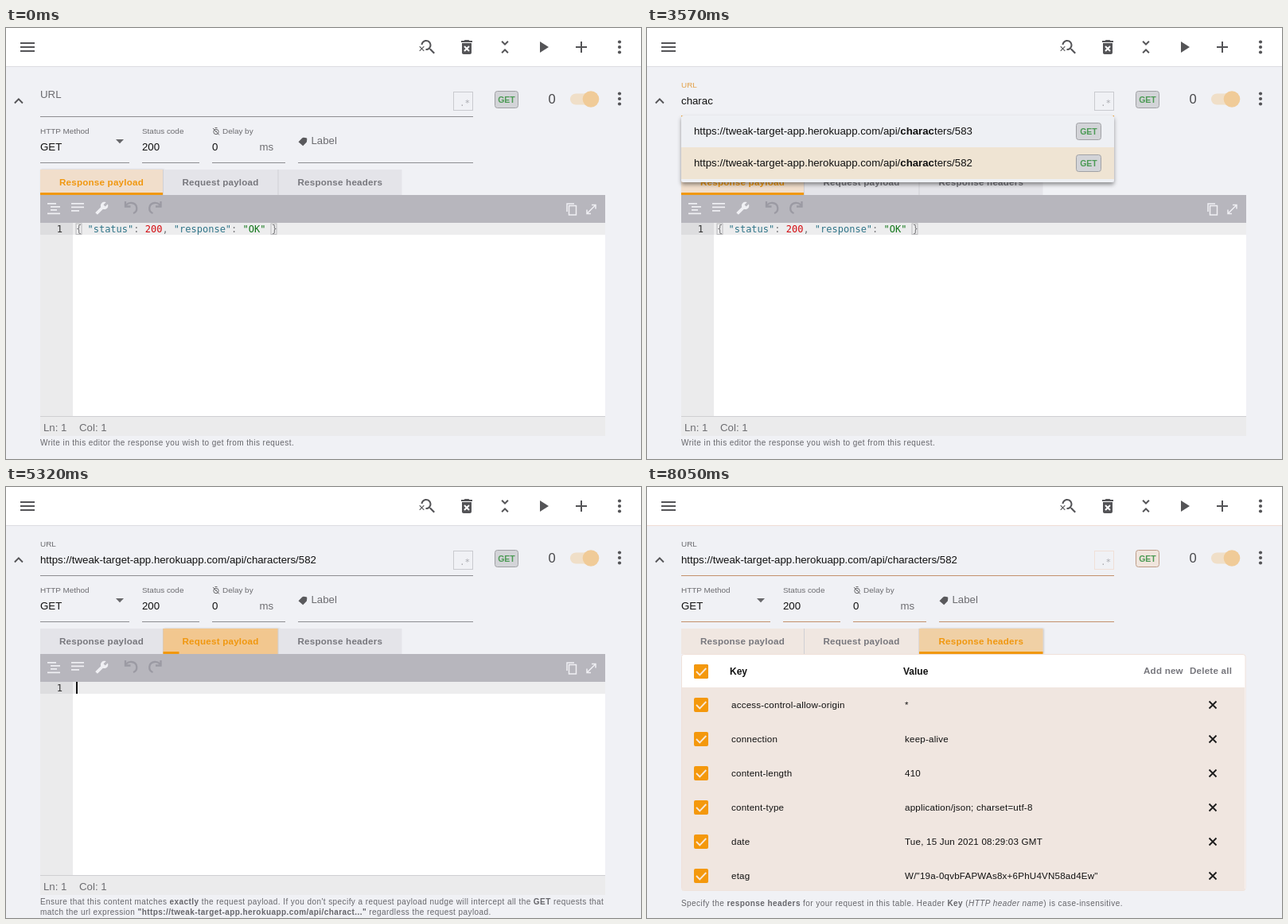
Write an HTML page that moves like this. It is 798 by 542 pixels and loops after 8120 ms.

```html
<!DOCTYPE html>
<html lang="en">
<head>
<meta charset="utf-8">
<title>Request editor</title>
<style>
html, body { margin: 0; width: 100%; height: 100%; overflow: hidden; background: #f0f1f5; }
svg { display: block; width: 798px; height: 542px; }
text { font-family: "Liberation Sans", Arial, sans-serif; white-space: pre; fill: #111; }
.body { font-size: 13.25px; }
.small { font-size: 9.94px; fill: #6c6c70; }
.tabText { font-size: 11.6px; font-weight: bold; letter-spacing: .22px; fill: #77777d; }
.hint { font-size: 10px; letter-spacing: .43px; fill: #66666b; }
.cell { font-size: 11.6px; letter-spacing: .2px; }
.head { font-size: 12px; font-weight: bold; }
.chipText { font-size: 10.5px; font-weight: bold; fill: #4b9a54; }
.code { font: 12px "DejaVu Sans Mono", "Liberation Mono", monospace; }
.key { fill: #2f7488; } .str { fill: #12771a; } .num { fill: #d40d12; } .pun { fill: #77777a; }
.grey { fill: #6c6c70; }
.icon { fill: #545457; }
.line { fill: #8d8d91; }
.tab { fill: #e4e4e9; }
.chip { fill: #d3d4d8; stroke: #a0a1a5; }
.box { fill: none; stroke: #c9cacf; }
.bar { fill: #f1980f; }
.warm .line { fill: #c3916c; }
.warm .tab { fill: #f0e7e1; }
.warm .chip { fill: #f0e5dd; stroke: #bd9c88; }
.warm .box { stroke: #f0e0d7; }
.warm #edge { fill: #f0dcd5; }
</style>
</head>
<body>
<svg id="stage" viewBox="0 0 798 542"></svg>
<script>
const LOOP = 8120, STEP = 70;
const URL_TEXT = 'https://tweak-target-app.herokuapp.com/api/characters/582';
const TABS = [
  { x: 43, w: 154.5, tx: 67, name: 'Response payload' },
  { x: 197.5, w: 145, tx: 221.5, name: 'Request payload' },
  { x: 342, w: 155.5, tx: 366.5, name: 'Response headers' }
];
const HEADERS = [
  ['access-control-allow-origin', '*'],
  ['connection', 'keep-alive'],
  ['content-length', '410'],
  ['content-type', 'application/json; charset=utf-8'],
  ['date', 'Tue, 15 Jun 2021 08:29:03 GMT'],
  ['etag', 'W/"19a-0qvbFAPWAs8x+6PhU4VN58ad4Ew"']
];
const PAYLOAD = [
  '{',
  '  "url": "https://anapioficeandfire.com/api/characters/582",',
  '  "name": "Tob Wenlark",',
  '  "gender": "Male",',
  '  "culture": "Valemen",',
  '  "born": "",',
  '  "died": "",',
  '  "titles": [',
  '    "Ser"',
  '  ],',
  '  "aliases": [',
  '    ""',
  '  ],',
  '  "father": "",',
  '  "mother": "",',
  '  "spouse": "",',
  '  "allegiances": ['
];

// Markup helpers
const text = (x, y, s, cls, more = '') => `<text x="${x}" y="${y}" class="${cls}" ${more}>${s}</text>`;
const rect = (x, y, w, h, more) => `<rect x="${x}" y="${y}" width="${w}" height="${h}" ${more}/>`;
const fill = (x, y, w, h, c) => rect(x, y, w, h, `fill="${c}"`);
const group = (id, inner, more = '') => `<g id="${id}" ${more}>${inner}</g>`;
const icon = (x, y, d, scale = 1) =>
  `<path class="icon" transform="translate(${x} ${y}) scale(${scale})" d="${d}"/>`;
const stroke = (d, c, w, more = '') =>
  `<path d="${d}" fill="none" stroke="${c}" stroke-width="${w}" ${more}/>`;
const dots = (x, y) => [-6.5, 0, 6.5].map(d => `<circle class="icon" cx="${x}" cy="${y + d}" r="2.1"/>`).join('');
const chip = (x, y, w) => rect(x + .5, y + .5, w - 1, 21, 'rx="3" class="chip"') +
  text(x + w / 2, y + 15, 'GET', 'chipText', 'text-anchor="middle"');
const tick = y => rect(59, y - 9, 18, 18, 'rx="2" fill="#f4980c"') +
  stroke(`M62 ${y}l4.3 4.3 8-8.3`, '#f8e8d8', 1.9);

function paint(line) {
  return line.replace(/"[^"]*"|\d+|[^"\d]+/g, (m, i) => {
    const cls = m[0] === '"' ? (line[i + m.length] === ':' ? 'key' : 'str') : /\d/.test(m) ? 'num' : 'pun';
    return `<tspan class="${cls}">${m}</tspan>`;
  });
}

function topBar() {
  return fill(0, 0, 798, 48, '#fff') + rect(0, 48, 798, 1, 'id="edge" fill="#dcdde1"') +
    icon(15, 12, 'M3 18h18v-2H3zm0-5h18v-2H3zm0-7v2h18V6z') +
    icon(518.5, 12, 'M15.5 14h-.79l-.28-.27C15.41 12.59 16 11.11 16 9.5 16 5.91 13.09 3 9.5 3 6.08 3 3.28 5.64 3.03 9h2.02C5.3 6.75 7.18 5 9.5 5 11.99 5 14 7.01 14 9.5S11.99 14 9.5 14c-.17 0-.33-.03-.5-.05v2.02c.17.02.33.03.5.03 1.61 0 3.09-.59 4.23-1.57l.27.28v.79l5 4.99L20.49 19z') +
    stroke('M519.7 23.2l5.6 5.6m0-5.6l-5.6 5.6', '#545457', 1.1) +
    icon(567, 12, 'M6 19c0 1.1.9 2 2 2h8c1.1 0 2-.9 2-2V7H6zM15.5 4l-1-1h-5l-1 1H5v2h14V4z') +
    stroke('M576 23l6 6m0-6l-6 6', '#fff', 2) +
    icon(615, 12, 'M7.41 18.59L8.83 20 12 16.83 15.17 20l1.41-1.41L12 14zM16.59 5.41L15.17 4 12 7.17 8.83 4 7.41 5.41 12 10z') +
    icon(663, 12, 'M8 5v14l11-7z') +
    icon(711, 12, 'M19 13h-6v6h-2v-6H5v-2h6V5h2v6h6z') + dots(771, 24);
}

function fields() {
  const rule = (x, w, y) => rect(x, y, w, 1, 'class="line"');
  return icon(4.5, 80.5, 'M12 8l-6 6 1.4 1.4L12 10.8l4.6 4.6L18 14z', .95) +
    rule(43, 544, 111) + rule(43, 112, 169) + rule(171, 72, 169) + rule(259, 92, 169) + rule(367, 220, 169) +
    rect(43, 110, 544, 2, 'id="focusLine"') +
    text(43, 88, 'URL', 'body', 'id="label"') + text(43, 96, '', 'body', 'id="url"') +
    rect(43, 84, 1.2, 15, 'id="caret" fill="#e39b35"') +
    rect(562.5, 80.5, 24, 23, 'class="box"') + text(570, 98, '.*', 'code', 'style="fill:#a9aaaf;font-size:11px"') +
    chip(614, 79, 30) + text(686, 95, '0', '', 'text-anchor="middle" style="font-size:16.5px;fill:#48484b"') +
    rect(709, 82.5, 34, 14, 'rx="7" id="track"') + '<circle cx="735" cy="89.5" r="10.3" id="thumb"/>' + dots(771, 89) +
    text(43, 133, 'HTTP Method', 'small') + text(43, 154, 'GET', 'body') + '<path d="M138 140h10l-5 5.2z" fill="#68686b"/>' +
    text(171, 133, 'Status code', 'small') + text(171, 154, '200', 'body') +
    '<circle cx="264" cy="130.5" r="3.2" fill="none" stroke="#68686b"/>' +
    stroke('M260 126l8 8.5M262.5 125.5h3M264 129v2', '#68686b', 1) +
    text(272, 133, 'Delay by', 'small') + text(259, 154, '0', 'body') + text(318.5, 154, 'ms', 'body grey') +
    '<path d="M367.5 143.2l4.6-4.6q1-1 2.2-.8l3 .4q1.200.2 1 1.400l-.3 3.200q0 .8-.9 1.500l-3.900 3.900z" fill="#59595c"/>' +
    text(383.5, 146, 'Label', 'body grey');
}

function tabs() {
  return TABS.map((t, i) => rect(t.x, 178, t.w, 32, 'class="tab"') +
    (i ? fill(t.x - .5, 178, 1, 32, '#d0d0d5') : '') +
    group('on' + i, rect(t.x, 178, t.w, 32, `id="glow${i}" filter="url(#soft)"`) +
      rect(t.x, 207, t.w, 3, `id="bar${i}" class="bar"`)) +
    text(t.tx, 198, t.name, 'tabText', `id="tab${i}"`)).join('');
}

function toolbar() {
  const w = '#f0f0f4', dim = '#9b9aa3';
  const turn = 'M151 222.500q3-3 7-2.500c8 1 8 11 2 13M150 218v6.500h6.500';
  return fill(43, 210, 710, 35, '#b7b6bd') +
    [[52, 220, 11], [56, 224, 12], [56, 228, 8], [52, 232.5, 16], [82, 220, 16], [82, 224.5, 16], [82, 229, 10]]
      .map(r => fill(r[0], r[1], r[2], 1.7, w)).join('') +
    `<path fill="${w}" transform="translate(129 218) scale(-.72 .72)" d="M22.700 19l-9.100-9.100c.9-2.300.4-5-1.500-6.900-2-2-5-2.400-7.400-1.300L9 6 6 9 1.600 4.700C.4 7.100.9 10.100 2.900 12.100c1.900 1.900 4.600 2.400 6.900 1.500l9.100 9.100c.4.4 1 .4 1.400 0l2.300-2.300c.5-.4.5-1.100.1-1.400z"/>` +
    stroke(turn, dim, 2.3) + stroke(turn, dim, 2.3, 'transform="translate(344.500) scale(-1 1)"') +
    stroke('M705 231v-10h9M707.500 223.500h9v11.500h-9z', w, 1.5) +
    stroke('M731 232.500l9-9M736 222.500h5v5M730 228.500v5h5', w, 1.5);
}

function editor(id, gutter, lines) {
  const x0 = 43 + gutter + 4;
  let s = fill(43, 245, 710, 243, '#fff') + fill(43, 245, gutter, 243, '#ebebec') +
    fill(43 + gutter, 245, 710 - gutter, 15, '#ededee') + fill(43, 245, gutter, 15, '#dddddf');
  lines.forEach((line, i) => {
    const y = 257 + 15 * i, open = lines.length > 1 && /[{[]$/.test(line);
    s += text(x0 - 17, y, i + 1, 'code', 'text-anchor="end" style="fill:#333"') + text(x0, y, paint(line), 'code');
    if (open) s += `<path d="M${x0 - 13.5} ${y - 6}h6l-3 3.500z" fill="#666"/>`;
  });
  const brace = x => rect(x + .5, 246, 7, 13.5, 'fill="none" stroke="#b9b9bc"');
  if (lines[0]) s += brace(x0 - .5);
  if (lines.length === 1 && lines[0]) s += brace(x0 + 244.5);
  return group(id, s, 'clip-path="url(#pane)"');
}

function editorArea() {
  return group('editor', toolbar() +
    editor('plain', 41, ['{ "status": 200, "response": "OK" }']) +
    editor('loaded', 48, PAYLOAD) + editor('blank', 41, ['']) +
    rect(88, 245, 2, 15, 'id="beam" fill="#111"') +
    fill(43, 488, 710, 25, '#ebebec') + fill(43, 488, 710, 1, '#cfcfd2') +
    text(47, 507, 'Ln: 1', 'body grey') + text(92, 507, 'Col: 1', 'body grey') +
    text(43, 525, 'Write in this editor the response you wish to get from this request.', 'hint', 'id="hintA"') +
    group('hintB',
      text(43, 525, "Ensure that this content matches <tspan font-weight='bold'>exactly</tspan> the request payload. If you don't specify a request payload nudge will intercept all the <tspan font-weight='bold'>GET</tspan> requests that", 'hint') +
      text(43, 538, 'match the url expression <tspan font-weight="bold">"https://tweak-target-app.herokuapp.com/api/charact..."</tspan> regardless the request payload.', 'hint')));
}

function table() {
  return group('table', rect(43.5, 210.5, 708.5, 297, 'rx="3" fill="#fff" stroke="#f0e1da"') +
    fill(44, 252, 707, 255.5, '#f0e6e0') +
    rect(60, 224, 16, 16, 'rx="1.500" fill="none" stroke="#68686b" stroke-width="2"') + group('all', tick(232)) +
    text(104, 236, 'Key', 'head') + text(322, 236, 'Value', 'head') +
    text(624, 235, 'Add new', 'tabText') + text(682, 235, 'Delete all', 'tabText') +
    HEADERS.map(([k, v], i) => {
      const y = 274 + 43 * i;
      return tick(y) + text(106, y + 4, k, 'cell') + text(324, y + 4, v, 'cell') +
        stroke(`M706.500 ${y - 4.5}l9 9m0-9l-9 9`, '#1c1c1c', 1.8);
    }).join('') +
    text(43, 527, 'Specify the <tspan font-weight="bold">response headers</tspan> for your request in this table. Header <tspan font-weight="bold">Key</tspan> (<tspan font-style="italic">HTTP header name</tspan>) is case-insensitive.', 'hint'));
}

function suggestions() {
  const row = (y, id) => text(59, y + 24, `https://tweak-target-app.herokuapp.com/api/<tspan font-weight="bold">charac</tspan>ters/${id}`, 'body') +
    chip(539, y + 9, 32);
  return rect(43, 112, 544, 10, 'id="ghost" fill="url(#fade)"') +
    group('panel', rect(43, 110, 544, 84, 'rx="3" fill="#eef0f4" filter="url(#lift)"') +
      rect(43, 110, 544, 40, 'id="pick" fill="#efe4d3"') + row(110, 583) + row(150, 582));
}

document.getElementById('stage').innerHTML = `<defs>
  <clipPath id="pane">${rect(43, 245, 710, 243, '')}</clipPath>
  <linearGradient id="fade" x2="0" y2="1"><stop stop-color="#777" stop-opacity=".4"/><stop offset="1" stop-color="#777" stop-opacity="0"/></linearGradient>
  <filter id="soft" x="-5%" y="-15%" width="110%" height="130%"><feDropShadow dx="1" dy="0" stdDeviation="1.200" flood-opacity=".2"/></filter>
  <filter id="lift" x="-5%" y="-20%" width="110%" height="150%"><feDropShadow dx="0" dy="3" stdDeviation="2.600" flood-opacity=".4"/></filter>
  </defs>` + fill(0, 0, 798, 542, '#f0f1f5') + topBar() + fields() + tabs() + editorArea() + table() + suggestions();

const $ = {};
document.querySelectorAll('#stage [id]').forEach(e => $[e.id] = e);
const stage = document.getElementById('stage');
const show = (id, on) => $[id].style.display = on ? '' : 'none';
const within = (t, ...spans) => spans.some(([a, b]) => t >= a && t < b);
const ramp = (t, a, b) => Math.min(1, Math.max(0, (t - a) / (b - a)));
const ease = u => u * u * (3 - 2 * u);
const mix = (a, b, u) => `rgb(${a.map((v, i) => Math.round(v + (b[i] - v) * u))})`;

// When each letter of the query lands
const KEYS = [1470, 1680, 1820, 2100, 2380, 2520];
const OPEN = 2450, PICKED = 3780, BLUR = 5110, TAB_START = [-1e4, 5250, 6580];

function drawUrl(t) {
  const focus = t >= 1190 && t < BLUR;
  const up = ramp(t, 1120, 1260);
  $.label.setAttribute('y', 88 - 13 * up);
  $.label.style.fontSize = 13.25 - 3.31 * up + 'px';
  $.label.style.fill = focus ? '#e3a24a' : '#6c6c70';
  $.url.textContent = t >= PICKED ? URL_TEXT : 'charac'.slice(0, KEYS.filter(k => t >= k).length);
  $.focusLine.style.fill = focus ? '#e89a2a' : '#77777b';
  $.focusLine.style.opacity = focus ? 1 : t < 1190 ? ramp(t, 630, 840) : 0;
  show('caret', within(t, [1260, 3010], [3290, 3570], [3780, 4200], [4690, BLUR]));
  $.caret.setAttribute('x', 43 + $.url.getComputedTextLength());
}

function drawPanel(t) {
  show('panel', t >= OPEN && t < 3850);
  const grow = ramp(t, OPEN - 70, OPEN + 140);
  $.panel.style.opacity = t >= PICKED ? .5 : grow;
  $.panel.setAttribute('transform', `translate(0 ${110 * .2 * (1 - grow)}) scale(1 ${.8 + .2 * grow})`);
  $.pick.setAttribute('y', t >= 3290 ? 150 : 110);
  show('ghost', t >= 3850);
  $.ghost.style.opacity = 1 - ramp(t, 3780, 4060) ** 2;
}

function drawTabs(t) {
  const now = t >= TAB_START[2] ? 2 : t >= TAB_START[1] ? 1 : 0;
  TABS.forEach((tab, i) => {
    show('on' + i, i === now);
    $['tab' + i].style.fill = i === now ? '#f0970f' : '';
    const start = TAB_START[i];
    $['bar' + i].setAttribute('width', tab.w * ease(ramp(t, start, start + 300)));
    $['glow' + i].style.fill = i ? mix([243, 197, 138], [240, 208, 165], ramp(t, start, start + 350)) : '#f1decb';
  });
  return now;
}

function draw(t) {
  drawUrl(t);
  drawPanel(t);
  const tab = drawTabs(t);
  show('editor', tab < 2);
  show('table', tab === 2);
  show('plain', t < 3850);
  show('loaded', tab === 0 && t >= 3850);
  show('blank', tab === 1);
  show('hintA', tab === 0);
  show('hintB', tab === 1);
  show('beam', within(t, [560, 1190], [5250, 5950], [6300, 6580]));
  show('all', t >= 7560);
  stage.classList.toggle('warm', tab === 2);
  const pale = within(t, [6580, 6720]);
  $.track.style.fill = pale ? '#efe6de' : '#f0dfc8';
  $.thumb.style.fill = pale ? '#f0e2d5' : '#f0cb98';
}

const begin = performance.now();
function tickFrame() {
  const t = (performance.now() - begin) % LOOP;
  draw(Math.floor(t / STEP) * STEP);
  requestAnimationFrame(tickFrame);
}
tickFrame();
</script>
</body>
</html>
```
